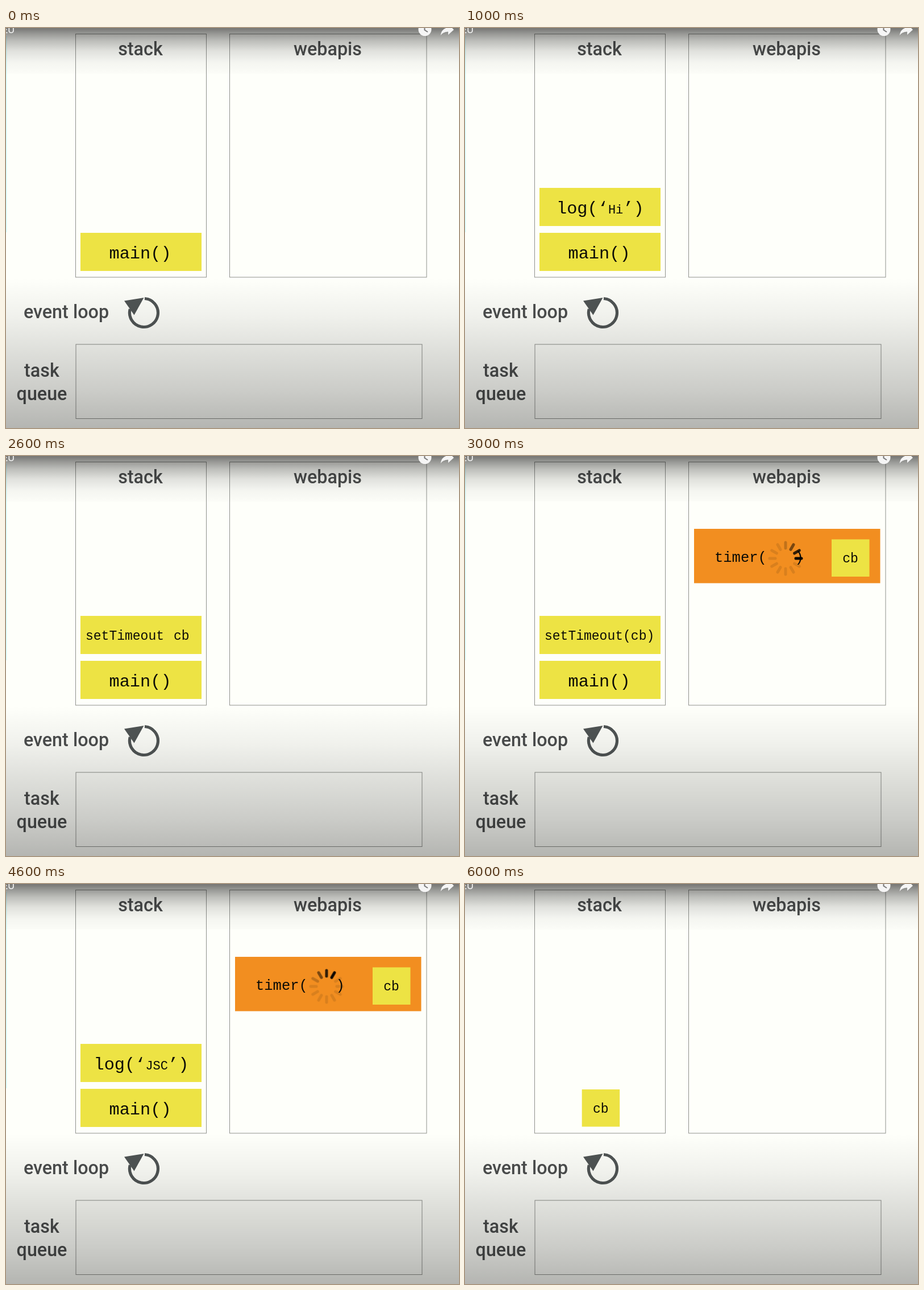
An HTML page that plays this animation: 797x703 px, repeating every 7 s.

```html
<!DOCTYPE html>
<html lang="en">
<head>
<meta charset="utf-8">
<title>Event loop</title>
<style>
html, body { margin: 0; width: 100%; height: 100%; overflow: hidden; background: #fefffa; }
svg { display: block; width: 797px; height: 703px; }
.label { font: 500 32.3px Roboto, sans-serif; fill: #4c4e4e; text-anchor: middle; }
.code { font: 30.3px "Liberation Mono", "Courier New", monospace; fill: #0b0b06; white-space: pre; }
.code .arg { font-size: 22px; }
.code.mid { font-size: 25.5px; }
.code.small { font-size: 23px; }
.frame { fill: none; stroke: #8f918d; }
.card { fill: #ede344; }
.timer { fill: #f28e20; }

/* --at: first second on screen; the keyframes give how long it stays */
.one, .two, .five { animation: one 7s step-end calc((var(--at) - 7) * 1s) infinite; }
.two { animation-name: two; }
.five { animation-name: five; }
@keyframes one { 0% { visibility: visible } 14.2857%, 100% { visibility: hidden } }
@keyframes two { 0% { visibility: visible } 28.5714%, 100% { visibility: hidden } }
@keyframes five { 0% { visibility: visible } 71.4285%, 100% { visibility: hidden } }

#spinner { animation: spin 7s step-end infinite; }
@keyframes spin { 0% { transform: rotate(90deg) } 57.1428%, 100% { transform: rotate(30deg) } }
</style>
</head>
<body>
<svg viewBox="0 0 797 703">
  <defs>
    <linearGradient id="top" x2="0" y2="1">
      <stop offset="0" stop-opacity=".54"/>
      <stop offset=".13" stop-opacity=".4"/>
      <stop offset=".28" stop-opacity=".26"/>
      <stop offset=".5" stop-opacity=".12"/>
      <stop offset=".75" stop-opacity=".04"/>
      <stop offset="1" stop-opacity=".01"/>
    </linearGradient>
    <linearGradient id="bottom" x2="0" y2="1">
      <stop offset="0" stop-opacity="0"/>
      <stop offset=".25" stop-opacity=".055"/>
      <stop offset=".5" stop-opacity=".13"/>
      <stop offset=".75" stop-opacity=".2"/>
      <stop offset="1" stop-opacity=".29"/>
    </linearGradient>
    <g id="cb">
      <rect class="card" width="66.5" height="65.5"/>
      <text class="code small" x="19.3" y="40.5">cb</text>
    </g>
  </defs>

  <rect width="797" height="703" fill="#fefffa"/>
  <rect class="five" style="--at:0" y="14" width="1.5" height="345" fill="#d5fbfb"/>

  <g class="frame">
    <rect x="122.5" y="10.5" width="230" height="427.5"/>
    <rect x="393.5" y="10.5" width="346.5" height="427.5"/>
    <rect x="123" y="556" width="609" height="130.5"/>
  </g>

  <g class="label">
    <text x="236.5" y="48">stack</text>
    <text x="566" y="48">webapis</text>
    <text x="106" y="510">event loop</text>
    <text x="63" y="613">task</text>
    <text x="63" y="654">queue</text>
  </g>

  <path d="M244 475.5A25 25 0 1 1 218.3 494" fill="none" stroke="#505555" stroke-width="5.2"/>
  <path d="M208 479.5L242.5 474L225.5 504.5Z" fill="#505555"/>

  <g class="five" style="--at:0">
    <rect class="card" x="131" y="360" width="213" height="67"/>
    <text class="code" x="181.5" y="404.5">main()</text>
  </g>

  <rect class="card one" style="--at:1" x="131" y="281" width="213" height="67"/>
  <text class="code one" style="--at:1" x="161" y="326">log(‘<tspan class="arg">Hi</tspan>’)</text>

  <g class="one" style="--at:2">
    <rect class="card" x="131" y="281" width="213" height="67"/>
    <text class="code small" x="140" y="323">setTimeout</text>
    <text class="code small" x="295" y="323">cb</text>
  </g>

  <g class="one" style="--at:3">
    <rect class="card" x="131" y="281" width="213" height="67"/>
    <text class="code small" x="140" y="323">setTimeout(cb)</text>
  </g>

  <g class="one" style="--at:4">
    <rect class="card" x="131" y="281" width="213" height="67"/>
    <text class="code" x="154.5" y="326">log(‘<tspan class="arg">JSC</tspan>’)</text>
  </g>

  <g class="two" style="--at:3">
    <rect class="timer" x="403" y="128" width="327.5" height="95.5"/>
    <text class="code mid" x="439" y="185.5">timer(</text>
    <text class="code mid" x="580.5" y="185.5">)</text>
    <g transform="translate(564 180)"><g id="spinner"></g></g>
    <use href="#cb" x="645" y="146.5"/>
  </g>

  <use href="#cb" class="one" style="--at:5" x="144" y="591.5"/>
  <use href="#cb" class="one" style="--at:6" x="205.7" y="361"/>

  <rect width="797" height="80" fill="url(#top)"/>
  <rect y="440" width="797" height="263" fill="url(#bottom)"/>

  <g fill="#f5f5f5">
    <text x="-7" y="9" font-family="Roboto, sans-serif" font-size="18">EU</text>
    <circle cx="737" cy="2.5" r="11.5"/>
    <path d="M736.5 -4V3.5L742 7" fill="none" stroke="#777" stroke-width="2"/>
    <path d="M778 -7L788 3L778 12V6.5Q769 6.5 764.5 13Q766 1 778 -1Z"/>
  </g>
</svg>
<script>
const spinner = document.getElementById('spinner');
const shades = [.95, .8, .5, .2];
for (let i = 0; i < 12; i++) {
  const blade = document.createElementNS(spinner.namespaceURI, 'path');
  blade.setAttribute('d', 'M0 -18V-28');
  blade.setAttribute('transform', `rotate(${-30 * i})`);
  blade.setAttribute('stroke', '#000');
  blade.setAttribute('stroke-width', 5);
  blade.setAttribute('stroke-linecap', 'round');
  blade.setAttribute('opacity', shades[i] || .1);
  spinner.append(blade);
}
</script>
</body>
</html>
```
